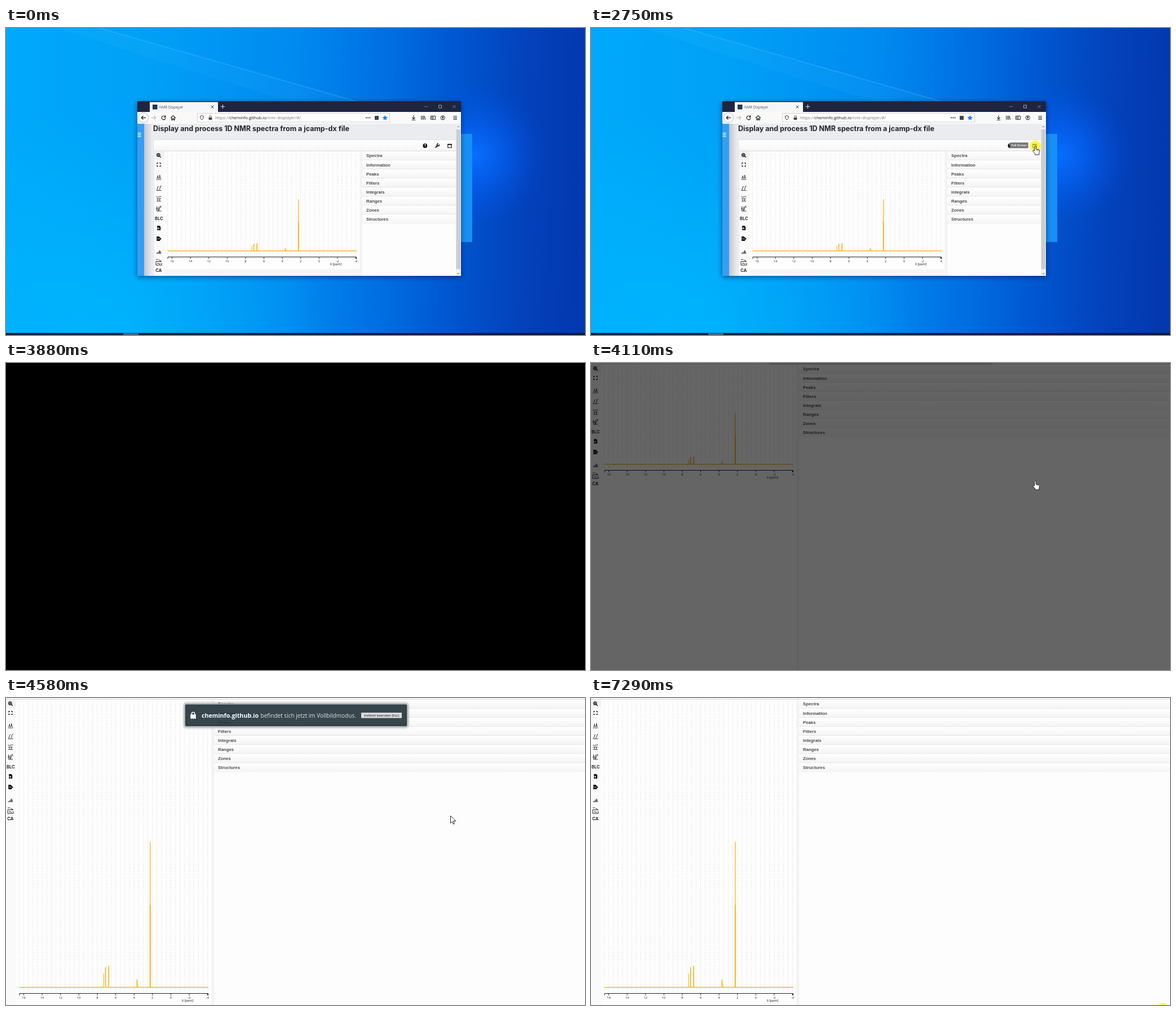
An HTML page with a canvas for the animation above (7.45 s loop, 1027 by 545 pixels).

```html
<!DOCTYPE html>
<html lang="en">
<head>
<meta charset="utf-8">
<title>NMR Displayer</title>
<style>
html, body { margin: 0; height: 100%; overflow: hidden; background: #000; }
canvas { display: block; }
</style>
</head>
<body>
<canvas id="stage" width="1027" height="545"></canvas>
<script>
const g = document.getElementById('stage').getContext('2d');
const W = 1027, H = 545, LOOP = 7450;
const OPEN = '"Open Sans", sans-serif', INTER = 'Inter, sans-serif', ARIAL = '"Liberation Sans", sans-serif';

function box(x, y, w, h, fill) {
  g.fillStyle = fill;
  g.fillRect(x, y, w, h);
}
function text(s, x, y, font, color = '#222', align = 'left') {
  g.font = font;
  g.fillStyle = color;
  g.textAlign = align;
  g.fillText(s, x, y);
}
// Fills the path, or strokes it when a width is given.
function draw(d, x, y, color = '#222', width = 0) {
  g.save();
  g.translate(x, y);
  g.fillStyle = g.strokeStyle = color;
  g.lineWidth = width;
  width ? g.stroke(new Path2D(d)) : g.fill(new Path2D(d));
  g.restore();
}
function disc(x, y, r, fill) {
  g.beginPath();
  g.arc(x, y, r, 0, 7);
  g.fillStyle = fill;
  g.fill();
}
function addStops(grad, stops) {
  stops.forEach(([p, c]) => grad.addColorStop(p, c));
  return grad;
}
const linear = (x0, y0, x1, y1, ...stops) => addStops(g.createLinearGradient(x0, y0, x1, y1), stops);
const radial = (x, y, r, ...stops) => addStops(g.createRadialGradient(x, y, 0, x, y, r), stops);

function desktop(active) {
  box(0, 0, W, H, linear(0, 0, W, 30, [0, '#00a9fb'], [.25, '#00a0f7'], [.5, '#008af0'], [.65, '#0070e3'],
    [.78, '#0056d0'], [.9, '#0342bb'], [1, '#0338af']));
  box(0, 0, W, H, radial(150, 560, 420, [0, 'rgba(0,188,255,.7)'], [1, 'rgba(0,188,255,0)']));
  box(0, 0, W, H, radial(832, 225, 125, [0, 'rgba(8,112,255,.95)'], [.4, 'rgba(6,100,250,.6)'], [1, 'rgba(4,80,230,0)']));
  draw('M165 0L620 130H500L90 0z', 0, 0, 'rgba(120,205,255,.05)');
  draw('M165 0L620 130', 0, 0, 'rgba(110,200,255,.3)', 1.5);
  box(635, 188, 192, 192, '#1590f4');
  box(0, 541.5, W, 4, '#0b1a30');
  box(active ? 103 : 208, 541.5, 27, 4, '#4c6274');
  text('10:10', 1006, 549, '6px ' + OPEN, '#ddd');
}

function chart(axis) {
  const base = axis - 10.8, scale = axis > 300 ? 2.825 : 1;
  const px = ppm => 31.5 + (16 - ppm) * 16.3;
  g.setLineDash([2, 2]);
  for (let x = 23.35; x < 360; x += 8.15) draw(`M${x} 7V${axis - 4}`, 0, 0, '#dedede', .8);
  g.setLineDash([]);
  const peak = (x, h, w) => draw(`M${x} ${base}V${base - h * scale}`, 0, 0, '#f8ab00', w);
  draw(`M24 ${base}H359`, 0, 0, '#f8ab00', 1.2);
  peak(173.3, 8.5, 1);
  peak(176.5, 12.7, 1.3);
  peak(182.2, 13.4, 1.5);
  peak(255.9, 91.5, 1.2);
  peak(255.6, 52, 1.5);
  draw(`M231.5 ${base}L232.4 ${base - 5 * scale}L233.8 ${base}`, 0, 0, '#f8ab00', 1);
  draw(`M24 ${axis + 3.5}V${axis}H358.5V${axis + 3.5}`, 0, 0, '#222', 1);
  for (let ppm = 16; ppm >= -4; ppm -= 2) {
    draw(`M${px(ppm)} ${axis}v3.5`, 0, 0, '#222', .9);
    text(ppm, px(ppm), axis + 9, '5.6px ' + OPEN, '#222', 'center');
  }
  text('δ [ppm]', 322, axis + 14.5, '5.6px ' + OPEN, '#111', 'center');
}

const FILE = 'M-2.8-4h4l2 2v6h-6z';
const TOOLS = [
  [10, 'M-3.4-.7a2.7 2.7 0 1 1 5.4 0a2.7 2.7 0 1 1-5.4 0M1.2 1.2L3.8 3.8M-2-.7h2.6M-.7-2v2.6', 1.3],
  [26.5, 'M-3-1v-2h2M1-3h2v2M3 1v2h-2M-1 3h-2v-2', 1.2],
  [49, 'M-4.5 4h9M-4 1.7h1.5L-1.7-3L-1 1.7H1L1.8-4L2.5 1.7H4', .8],
  [68, 'M-4.5 4.3h9M-4 3q1.8 0 2-3t2-3M.5 3q1.5 0 1.8-3.5t2.2-3.5', .9],
  [87, 'M-4.5-4L-2-2.5 1-3.5 4.5-4M-4 0h8M-2 0v4M1.5 0v4M-4 4.3h8', .8],
  [105, 'M-3.5-4.5V4H4.5M-4.5 1q2-6 3 0t3-2 2.5-1M0-4v7', .8],
  [181, 'M-4.5 3h9M-2 1.2v1.5M0-.5v3M1.5-2.5v5M3-1v3.5', .9],
  [200, 'M-5-5h4M-5-1.5h10M-5-1.5V5H5V1M-3 3l2-2 2 2.5 2-2M0-4.5l4 2.5', .9],
];
const ROWS = ['Spectra', 'Information', 'Peaks', 'Filters', 'Integrals', 'Ranges', 'Zones', 'Structures'];

// The viewer below its top bar; the bar ends at y = 2.
function viewer(axis, right, bottom) {
  box(0, 2, right, bottom, '#fdfdfd');
  box(0, 2, 18, bottom, '#fafafa');
  box(0, 3, 18, 15, '#f1f1f1');
  box(364.5, 2, 4.5, bottom, '#f3f3f3');
  TOOLS.forEach(([y, d, w]) => draw(d, 8, y, '#111', w));
  text('BLC', 1, 125.3, '600 7.6px ' + INTER, '#111');
  text('CA', 2.3, 216.6, '600 7.6px ' + INTER, '#111');
  draw(FILE, 8, 139, '#111');
  draw('M-4 .8h5M-1-1l2 1.8-2 1.8', 8, 139, '#fff', .9);
  draw(FILE, 7, 158, '#111');
  draw('M0 .3h5M3-1.5l2 1.8-2 1.8', 7, 158, '#111', 1.1);
  draw('M-1.5 .3h4', 7, 158, '#fff', .8);
  chart(axis);
  ROWS.forEach((name, i) => {
    const y = 2.5 + i * 16.13;
    box(369, y, right - 369, 16.1, linear(0, y, 0, y + 16, [0, '#fff'], [1, '#f4f4f4']));
    if (i < 7) box(369, y + 15.5, right - 369, 1, '#dcdcdc');
    text(name, 376, y + 10.9, 'bold 7.8px ' + ARIAL, '#4a4a4a');
  });
  box(0, 1.8, right, 1, '#dcdcdc');
}

function wrench(x) {
  draw('M-3.2 3.4L.8-.6', x, 209, '#111', 2);
  draw('M3.4-2.2a2 2 0 1 1-1.6-1.4', x, 209, '#111', 1.6);
}
function help(x) {
  disc(x, 209, 3.9, '#111');
  text('?', x, 211.4, 'bold 6.5px ' + INTER, '#fff', 'center');
}
function tip(s, x) {
  box(x, 203.3, 775.5 - x, 10, '#747474');
  text(s, (x + 775.5) / 2, 210.3, '600 5.2px ' + INTER, '#fff', 'center');
}

function browser(t, active) {
  g.save();
  g.shadowColor = 'rgba(0,15,60,.6)';
  g.shadowBlur = 9;
  g.shadowOffsetY = 2;
  box(233, 130, 574, 310, '#1f2440');
  g.restore();

  // Tabs and window buttons
  box(255, 131.5, 121, 18, '#f5f6f7');
  box(260, 136, 8.5, 8.5, '#1d3a5c');
  text('NMR Displayer', 272, 142.6, '6.2px ' + OPEN, active ? '#111' : '#555');
  draw('M-2.3-2.3l4.6 4.6m0-4.6l-4.6 4.6', 366, 140, '#333', 1);
  draw('M-3.8 0h7.6M0-3.8v7.6', 384.5, 139.5, '#ddd', 1);
  const ctl = active ? '#eee' : '#80849a';
  draw('M-3 0h6', 745, 139.5, ctl, .9);
  draw('M-2.5-2.5h5v5h-5z', 770, 139.5, active ? '#eee' : '#b4b7c4', .9);
  draw('M-2.5-2.5l5 5m0-5l-5 5', 795, 139.5, ctl, .9);

  // Address bar
  box(233, 149, 574, 21, '#f9f9fa');
  draw('M-8.8 0a8.8 8.8 0 1 1 17.6 0a8.8 8.8 0 1 1-17.6 0', 244, 159.3, '#b5b5b8', .8);
  const arrow = 'M4 0h-7.5M-.5-3.3l-3.3 3.3 3.3 3.3';
  draw(arrow, 244, 159.3, '#222', 1.3);
  draw('M-4 0h7.5M.5-3.3l3.3 3.3-3.3 3.3', 262, 159.3, '#bbb', 1.2);
  draw('M2.7-2a3.4 3.4 0 1 0 .7 2.6M3.4-4v2.8h-2.8', 279.5, 159.3, '#222', 1.2);
  draw('M-4.2 .2L0-3.8 4.2 .2M-2.8-.5v4.3h2v-2.6h1.6v2.6h2v-4.3', 296.5, 159.3, '#222', 1.1);
  box(339, 151.3, 342, 16, '#c9c9cc');
  box(339.8, 152.1, 340.4, 14.4, '#fff');
  draw('M0-3.8L3-2.8Q3 2 0 3.8Q-3 2-3-2.8z', 347.3, 159.3, '#333', 1);
  draw('M-1.8-.5v-1.2a1.8 1.8 0 0 1 3.6 0v1.2', 362.5, 159.3, '#444', 1);
  box(359.6, 158.8, 5.8, 4.2, '#444');
  const url = '7.45px ' + OPEN;
  let x = 371;
  [['https://', '#777'], ['cheminfo.github.io', '#111'], ['/nmr-displayer/#/', '#777']].forEach(([s, c]) => {
    text(s, x, 162, url, c);
    x += g.measureText(s).width;
  });
  [-3.2, 0, 3.2].forEach(d => disc(642.3 + d, 159.3, 1.1, '#333'));
  box(654, 156, 7, 7, '#444');
  draw('M0-4.6l1.4 3 3.3.4-2.4 2.3.6 3.3L0 2.8l-2.9 1.6.6-3.3-2.4-2.3 3.3-.4z', 672.3, 159.3, '#0a84ff');
  draw('M0-4v6M-2.6-.4L0 2.2 2.6-.4M-3.3 4h6.6', 723, 159.3, '#222', 1.1);
  draw('M-3.3-3.5v7M-1-3.5v7M1-3.5v7M2-3l2 6.5', 740, 159.3, '#222', 1);
  draw('M-4-3h8v6h-8zM0-3v6M-3-1h2M-3 1h2', 757.5, 159.3, '#222', 1);
  draw('M-3.7 0a3.7 3.7 0 1 1 7.4 0a3.7 3.7 0 1 1-7.4 0', 774.7, 159.3, '#222', .9);
  disc(774.7, 158.3, 1.5, '#222');
  draw('M-2.3 2.3q2.3-2.3 4.6 0z', 774.7, 159.3);
  draw('M-3.3-2.6h6.6M-3.3 0h6.6M-3.3 2.6h6.6', 796.7, 159.3, '#222', 1.1);

  // Page
  g.save();
  g.beginPath();
  g.rect(233, 170, 574, 270);
  g.clip();
  box(233, 170, 574, 270, '#ebecf0');
  box(245, 170, 14, 270, linear(245, 0, 259, 0, [0, '#c3c5cc'], [1, '#ebecf0']));
  box(233, 170, 12, 270, '#329ff5');
  draw('M0 0h6.3M0 3h6.3M0 6h6.3', 233.3, 186.6, '#fff', 1.3);
  text('Display and process 1D NMR spectra from a jcamp-dx file', 261, 183, 'bold 12.5px ' + INTER, '#212529');
  box(261, 198, 537, 20, '#dadbdf');
  box(261.8, 198.8, 536, 19.2, linear(0, 198, 0, 218, [0, '#fff'], [1, '#f6f6f6']));
  g.save();
  g.translate(263, 216);
  viewer(190.5, 535, 230);
  box(18, 212, 346.5, 14, '#f5f5f5');
  g.restore();
  const swapped = t >= 3700;
  if (swapped) {
    wrench(787);
    tip('General Settings', 728);
  } else {
    help(743.3);
    wrench(765);
    draw('M-3.3-2.8h6.6v6h-6.6zM-3.3-1.9h6.6', 787, 209, '#111', 1.1);
    if (t >= 2750) tip('Full Screen', 743);
  }
  box(798, 170, 9, 270, '#f1f1f1');
  box(798.6, 180, 7.6, 248, '#cdcdcd');
  draw('M-1.8 1L0-.8 1.8 1', 802.4, 175, '#555', 1);
  draw('M-1.8-1L0 .8 1.8-1', 802.4, 436, '#555', 1);
  g.restore();
}

function banner(dy) {
  g.save();
  g.translate(0, dy);
  g.shadowColor = 'rgba(0,0,0,.4)';
  g.shadowBlur = 4;
  g.beginPath();
  g.roundRect(317, 10.5, 395, 40.5, 3);
  g.fillStyle = 'rgba(44,60,68,.9)';
  g.fill();
  g.strokeStyle = '#b4bbc0';
  g.lineWidth = 1.8;
  g.stroke();
  g.shadowBlur = 0;
  g.shadowColor = 'transparent';
  draw('M-2.8 0v-2a2.8 2.8 0 0 1 5.6 0v2', 332, 30, '#fff', 1.5);
  box(327.2, 29.3, 9.6, 7.4, '#fff');
  text('cheminfo.github.io', 347, 34.9, 'bold 10.7px ' + OPEN, '#fff');
  text('befindet sich jetzt im Vollbildmodus.', 451.5, 34.9, '10.05px ' + OPEN, '#dfe3e5');
  box(630, 26, 72, 9.6, '#d9dadb');
  text('Vollbild beenden (Esc)', 666, 33, '6.1px ' + OPEN, '#111', 'center');
  g.restore();
}

// Cursor moves: start, end, steps, then a quadratic curve.
const MOVES = [
  [370, 750, 6, [986, 570], [842, 479], [698, 389]],
  [980, 1680, 10, [698, 389], [660, 175], [795, 208]],
  [1740, 2050, 5, [795, 208], [791, 208], [788.5, 209]],
  [5670, 6280, 9, [788.5, 209], [800, 370], [828, 511]],
  [6990, 7290, 5, [828, 511], [920, 515], [1014, 551]],
];
const progress = (t, t0, t1, n) => Math.min(1, Math.floor((t - t0) / (t1 - t0) * (n - 1) + 1.001) / n);

function cursor(t) {
  const move = MOVES.findLast(m => t >= m[0]);
  if (!move || (t >= 3880 && t < 4110)) return;
  const [t0, t1, n, a, b, c] = move;
  const p = progress(t, t0, t1, n), q = 1 - p;
  const [x, y] = a.map((v, i) => q * q * v + 2 * p * q * b[i] + p * p * c[i]);
  if ((t >= 2750 && t < 3460) || t >= 7290) disc(x, y + .5, 10, 'rgba(255,243,0,.66)');
  const hand = t >= 1900 && t < 4350;
  const shape = hand
    ? 'M-2 1.2Q-.8-.6.6 1V6l5 .9Q7.4 7.3 7.2 9L6.2 13.5V16H-.8V14.2L-4.6 9.6Q-4.8 7.6-3 8.2L-1.8 9.3z'
    : 'M0 0V13.2L3 10.4 5 15 7 14.1 5 9.6H9.4z';
  draw(shape, x, y, '#fff');
  draw(shape, x, y, '#111', .9);
  if (hand) draw('M2.4 6.8v2.4M4.6 7.2v2.2', x, y, '#111', .7);
}

// Value of the last key reached, as [time, value].
const hold = (t, keys) => keys.findLast(k => t >= k[0])[1];
const DIM = [[0, 0], [3700, .31], [3800, .68], [3880, 1], [4110, .6], [4210, .19], [4280, .06], [4350, 0]];
const SLIDE = [[0, -60], [4110, -52], [4210, -29], [4280, -10], [4350, 0]];

function render(t) {
  if (t < 4110) {
    const active = t >= 2850;
    desktop(active);
    browser(t, active);
  } else {
    box(0, 0, W, 2, '#f6f6f6');
    viewer(t < 4580 ? 190.5 : 524.5, W, H);
    banner(t < 6990 ? hold(t, SLIDE) : -60 * progress(t, 6990, 7290, 5));
  }
  const dim = hold(t, DIM);
  if (dim) box(0, 0, W, H, `rgba(0,0,0,${dim})`);
  cursor(t);
}

function tick(now) {
  render(now % LOOP);
  requestAnimationFrame(tick);
}
requestAnimationFrame(tick);
</script>
</body>
</html>
```
